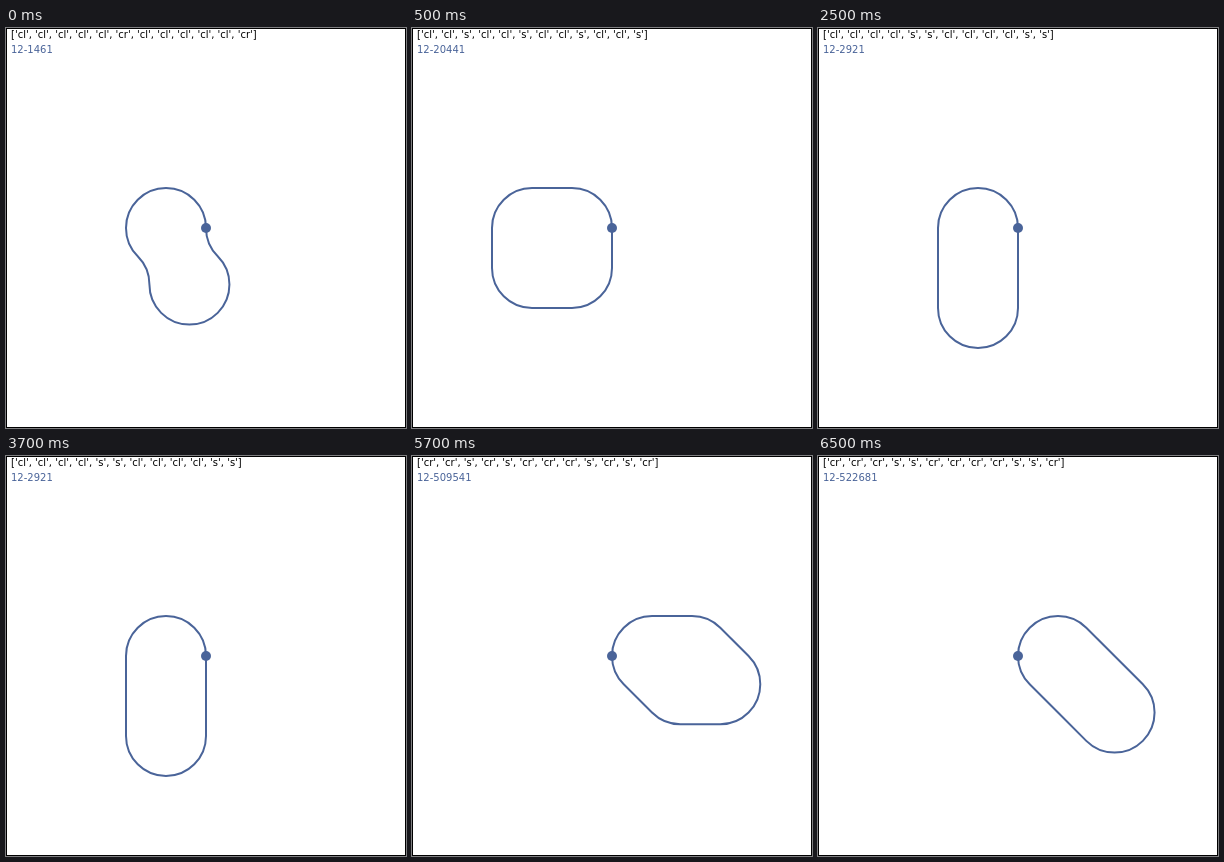
An HTML page with a canvas for the animation above (8 s loop, 400 px wide and 400 px high).

```html
<!DOCTYPE html>
<html>
<head>
<meta charset="utf-8">
<style>
  html, body { margin: 0; overflow: hidden; background: #fff; }
  canvas { display: block; }
</style>
</head>
<body>
<canvas id="stage" width="400" height="400"></canvas>
<script>
const ctx = document.getElementById('stage').getContext('2d');
const BLUE = '#4a6499', STEP = 40, TURN = Math.PI / 4, LOOP = 8000;

const tracks = [
  { at: 0, id: '12-1461', path: 'cl cl cl cl cl cr cl cl cl cl cl cr' },
  { at: 500, id: '12-20441', path: 'cl cl s cl cl s cl cl s cl cl s' },
  { at: 2500, id: '12-2921', path: 'cl cl cl cl s s cl cl cl cl s s' },
  { at: 4500, id: '12-509541', path: 'cr cr s cr s cr cr cr s cr s cr' },
  { at: 6500, id: '12-522681', path: 'cr cr cr s s cr cr cr cr s s cr' }
];

// Lay straight and curved pieces end to end, starting upwards from the centre.
function tracePieces(pieces) {
  let x = 200, y = 200, heading = -Math.PI / 2;
  ctx.beginPath();
  ctx.moveTo(x, y);
  for (const piece of pieces) {
    if (piece === 's') {
      x += STEP * Math.cos(heading);
      y += STEP * Math.sin(heading);
      ctx.lineTo(x, y);
      continue;
    }
    const side = piece === 'cr' ? 1 : -1;
    const normal = heading + side * Math.PI / 2;
    const cx = x + STEP * Math.cos(normal), cy = y + STEP * Math.sin(normal);
    const from = normal + Math.PI, to = from + side * TURN;
    ctx.arc(cx, cy, STEP, from, to, side < 0);
    x = cx + STEP * Math.cos(to);
    y = cy + STEP * Math.sin(to);
    heading += side * TURN;
  }
  ctx.stroke();
}

function label(text, y, color) {
  ctx.fillStyle = color;
  ctx.fillText(text, 5, y);
}

function draw(track) {
  const pieces = track.path.split(' ');
  ctx.fillStyle = '#fff';
  ctx.fillRect(0, 0, 400, 400);
  ctx.lineWidth = 1;
  ctx.strokeStyle = '#000';
  ctx.strokeRect(0.5, 0.5, 399, 399);

  ctx.font = '10px "DejaVu Sans", sans-serif';
  label(`[${pieces.map(p => `'${p}'`).join(', ')}]`, 10, '#000');
  label(track.id, 25, BLUE);

  ctx.lineWidth = 2;
  ctx.strokeStyle = ctx.fillStyle = BLUE;
  tracePieces(pieces);
  ctx.beginPath();
  ctx.arc(200, 200, 5, 0, 2 * Math.PI);
  ctx.fill();
}

const start = performance.now();
function tick(now) {
  const t = Math.max(0, now - start) % LOOP;
  draw(tracks.findLast(track => t >= track.at));
  requestAnimationFrame(tick);
}
tick(start);
</script>
</body>
</html>
```
